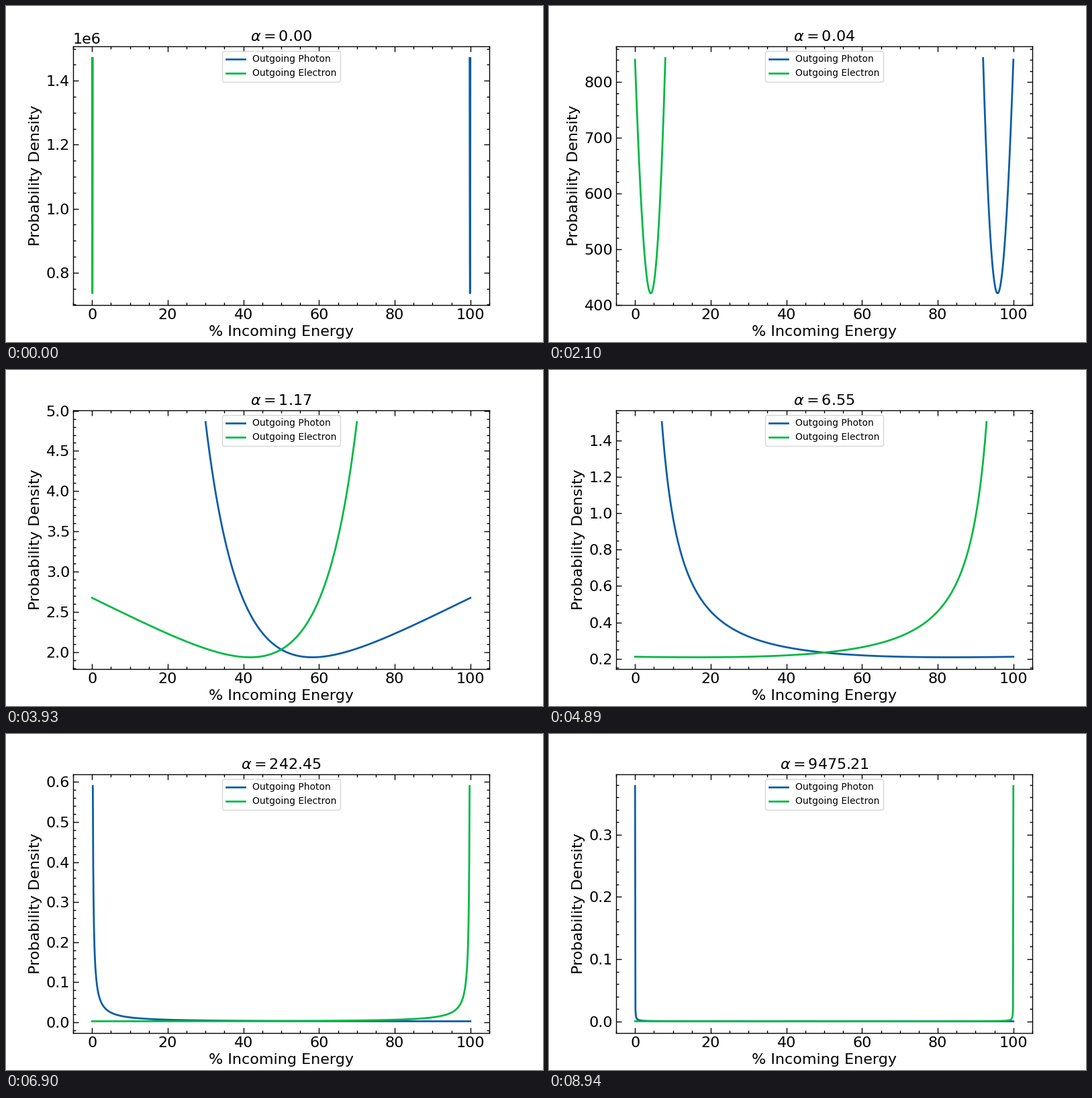
Recreate the animation shown at these times as a matplotlib script. Size 800 by 500 pixels, loop 8.97 s.

```python
import numpy as np
import matplotlib.pyplot as plt
from matplotlib.animation import FuncAnimation

FRAMES = 299
STEP_MS = 30
M_E = 0.511  # electron rest energy, MeV

plt.rcParams.update({
    "font.family": "DejaVu Sans",
    "font.size": 16,
    "axes.titlesize": 16,
    "axes.linewidth": 1,
    "legend.fontsize": 10,
    "lines.linewidth": 2,
})
for axis, far_side in (("xtick", "top"), ("ytick", "right")):
    plt.rcParams.update({
        f"{axis}.direction": "in",
        f"{axis}.{far_side}": True,
        f"{axis}.minor.visible": True,
        f"{axis}.major.size": 6,
        f"{axis}.minor.size": 3,
        f"{axis}.major.width": 1,
        f"{axis}.minor.width": 1,
    })


def total_cross_section(a):
    """Klein-Nishina total cross section in units of Thomson's."""
    b = 1 + 2 * a
    log = np.log1p(2 * a)
    return 0.75 * ((1 + a) / a**2 * (2 * (1 + a) / b - log / a)
                   + log / (2 * a) - (1 + 3 * a) / b**2)


def photon_density(a, n=1000):
    """Outgoing photon energy fraction and its probability density."""
    frac = np.linspace(1 / (1 + 2 * a), 1, n)
    cos = 1 - (1 / frac - 1) / a
    shape = frac + 1 / frac - (1 - cos**2)
    return frac, 3 / 8 * shape / (M_E * a**2 * total_cross_section(a))


fig, ax = plt.subplots(figsize=(8, 5), dpi=100)
photon, = ax.plot([], [], color="#0C5DA5", label="Outgoing Photon")
electron, = ax.plot([], [], color="#00B945", label="Outgoing Electron")
ax.set_xlim(-5, 105)
ax.set_xlabel("% Incoming Energy")
ax.set_ylabel("Probability Density")
ax.legend(loc="upper center")
title = ax.set_title("")


def update(i):
    a = 10 ** (-3 + 7 * i / FRAMES)
    frac, density = photon_density(a)
    photon.set_data(100 * frac, density)
    electron.set_data(100 * (1 - frac), density)
    low, high = density.min(), density.max()
    margin = 0.05 * (high - low)
    ax.set_ylim(low - margin, high + margin)
    title.set_text(rf"$\alpha = {a:.2f}$")
    return photon, electron, title


anim = FuncAnimation(fig, update, frames=FRAMES, interval=STEP_MS,
                     repeat=True, repeat_delay=0, blit=False)
plt.show()
```
